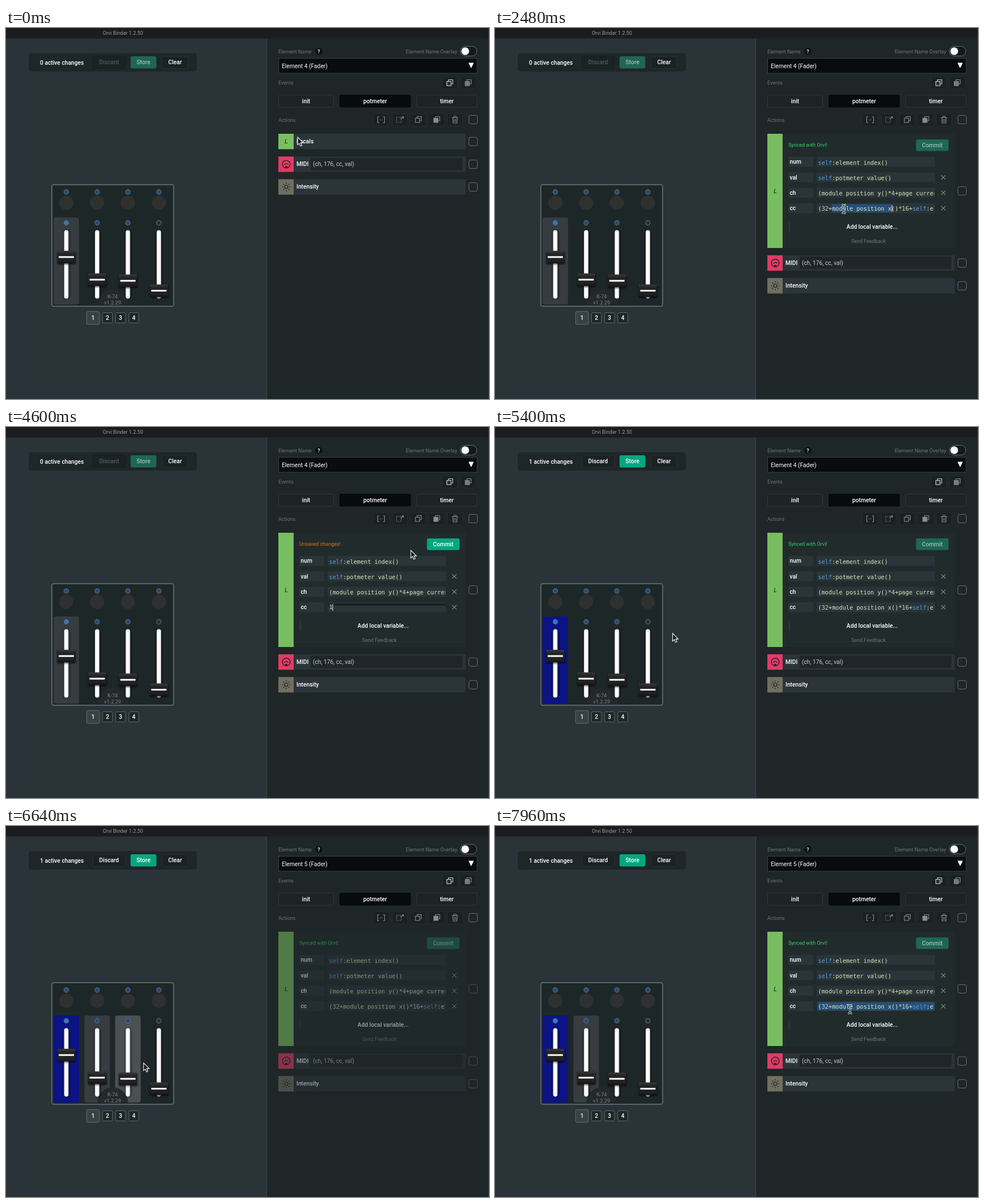
Recreate the animation shown at these times as an HTML page. Size 853 by 656 pixels, loop 8 s.

```html
<!DOCTYPE html>
<html lang="en">
<head>
<meta charset="utf-8">
<title>Fader setup</title>
<style>
  html, body { margin: 0; width: 100%; height: 100%; overflow: hidden; background: #2a3338; }
  svg { display: block; }
  text { font: 400 10.25px Roboto, sans-serif; fill: #fff; white-space: pre; }
  .small { font-size: 9px; }
  .dim { fill: #6c7577; }
  .bold { font-weight: 500; }
  .mid { text-anchor: middle; }
  .code { font: 10.25px "DejaVu Sans Mono", monospace; fill: #dfe6b4; }
  .self { fill: #569cd6; }
  .num { fill: #c5dbb2; }
  .line { fill: none; stroke: #868e90; stroke-width: 1.1; }
</style>
</head>
<body>
<script>
const LOOP = 8000, STEP = 40;
const COLS = [106.5, 161, 215.3, 270];
const CAPS = [405, 445, 447, 464.5];
const ROWS = [237, 264.3, 291.6, 318.9];
const TOP = 187, CLOSED = 27.3, OPEN = 202;

const rect = (x, y, w, h, fill, more = "") =>
  `<rect x="${x}" y="${y}" width="${w}" height="${h}" fill="${fill}" ${more}/>`;
const text = (x, y, str, cls = "", more = "") =>
  `<text x="${x}" y="${y}" class="${cls}" ${more}>${str}</text>`;
const group = (id, body, more = "") => `<g id="${id}" ${more}>${body}</g>`;
const path = (d, more = 'class="line"') => `<path d="${d}" ${more}/>`;
const box = (x, y, w, h, fill, stroke, r = 2) =>
  rect(x + .5, y + .5, w - 1, h - 1, fill, `stroke="${stroke}" rx="${r}"`);
const button = (x, y, w, h, label, fill, stroke, more = "") =>
  box(x, y, w, h, fill, stroke) +
  text(x + w / 2, y + h / 2 + 3.7, label, "bold mid", more);
const check = y => box(817, y - 8, 16, 16, "none", "#697173", 3);

function toolbar() {
  return rect(40, 44.5, 297, 32.5, "#1e2628", 'rx="5"') +
    text(60, 64.5, "0 active changes", "bold", 'id="count"') +
    button(153, 49.5, 58, 22.5, "Discard", "#1b2224", "#151b1d", 'style="fill:#50595b"') +
    button(220, 50, 45.5, 21.5, "Store", "#1f6656", "#1f6656", 'style="fill:#9dbdb4"') +
    button(275, 49.5, 47, 22.5, "Clear", "#1b2224", "#2a3234") +
    group("pending",
      button(153, 49.5, 58, 22.5, "Discard", "#1b2224", "#2a3234") +
      button(220, 50, 45.5, 21.5, "Store", "#06a680", "#06a680"));
}

function led(x, y, fill) {
  return `<circle cx="${x}" cy="${y}" r="4" fill="${fill}" stroke="#586774" stroke-width="1.3"/>`;
}

function fader(x, i) {
  const y = CAPS[i];
  return rect(x - 5, 358, 11, 121, "#0008", 'rx="5" filter="url(#soft)"') +
    rect(x - 4, 357.5, 8, 121, "url(#track)", 'rx="4"') +
    rect(x - 16, y - 10, 33, 23, "#000a", 'rx="2" filter="url(#soft)"') +
    rect(x - 16, y - 11, 32, 22, "url(#cap)", 'rx="1.5"') +
    rect(x - 13.5, y - 1.4, 27, 2.8, "#fff", 'rx=".6"') +
    led(x, 344.5, i == 0 ? "#2a78dc" : i == 3 ? "#263034" : "#1f4b80");
}

function device() {
  const knobs = COLS.map(x => led(x, 290, "#1f4b80") +
    `<circle cx="${x}" cy="309" r="12.5" fill="#2f3131"/>`).join("");
  const lanes = COLS.map((x, i) =>
    rect(x - 22.5, 335, 45, 154, "none", `id="lane${i}" rx="4"`)).join("");
  return rect(81, 277, 215, 215, "#1e2728", 'rx="3.5" stroke="#5b6465" stroke-width="2"') +
    knobs + lanes +
    path("M161.5 489A27 27 0 0 1 215.5 489Z", 'fill="#222a2c"') +
    text(188.3, 478, "K-74", "small bold mid", 'style="fill:#697072"') +
    text(188.3, 489, "v1.2.29", "small bold mid", 'style="fill:#697072"') +
    COLS.map(fader).join("");
}

function pages() {
  const small = [170, 193, 216.5].map((x, i) =>
    button(x, 503, 18.5, 19, i + 2, "#1e2628", "#606869")).join("");
  return button(142, 501, 23.5, 23.5, 1, "#394145", "#666e70") + small;
}

function header() {
  const tool = x => box(x, 151, 28, 22.5, "#1a2123", "#252d2f");
  const stack = (x, y, front) =>
    path(`M${x - 2} ${y - 3}v-2.5h7.5v7.5h-2.5`) + rect(x - 5, y - 2.5, 7.5, 7.5, front, 'class="line" style="fill:' + front + '"');
  return text(481, 44.5, "Element Name", "small dim") +
    '<circle cx="552.5" cy="41.3" r="6.3" fill="#0d1213"/>' +
    text(552.5, 44.6, "?", "small bold mid") +
    text(706, 44.5, "Element Name Overlay", "small dim") +
    rect(802.5, 32.5, 29, 17, "#14191a", 'rx="8.5" stroke="#697173"') +
    '<circle cx="811" cy="41" r="6.8" fill="#fff"/>' +
    box(481, 53, 351.5, 27.5, "#080c0d", "#3b4345", 0) +
    text(487, 70.5, "", "", 'id="element"') +
    path("M816.8 61.5h9.4l-4.7 9.5z", 'fill="#fff"') +
    text(481, 100, "Events", "small dim") +
    box(770, 85.5, 28, 22.5, "#1a2123", "#252d2f") + box(802.5, 85.5, 28, 22.5, "#1a2123", "#252d2f") +
    group("", stack(783.5, 97, "#1a2123"), 'style="filter:brightness(1.5)"') +
    stack(816, 97, "#737b7d") +
    button(481, 118, 98, 22.5, "init", "#1c2426", "#30383a") +
    button(589, 118, 126, 22.5, "potmeter", "#070b0c", "#070b0c") +
    button(724.5, 118, 108, 22.5, "timer", "#1c2426", "#30383a") +
    text(481, 165.5, "Actions", "small dim") +
    [648.5, 681.5, 714, 746.5, 779].map(tool).join("") +
    path("M659 157h-2.5v10.5h2.5M666 157h2.5v10.5h-2.5") +
    path("M660 162.5h5", 'class="line" stroke-dasharray="1.2 1"') +
    path("M690 158h8v9h-8z", 'class="line" stroke-dasharray="1.5 1.5"') +
    path("M697 161l5 -4M699 157h3v3") +
    stack(728, 162, "#1a2123") + stack(760.5, 162, "#868e90") +
    path("M787.5 158.5h11M791 158v-2h4v2M789 159l.7 9h6.6l.7-9M791.7 161v5M794.3 161v5") +
    check(162);
}

function editor(y, name, code, id) {
  return rect(518, y - 9, 44, 17.5, "#2a3439") + text(520.5, y + 3.3, name, "bold") +
    rect(568, y - 9, 209, 17.5, "#2a3439") +
    (id ? rect(0, y - 7.4, 0, 14.6, "#264f78", 'id="pick"') : "") +
    `<svg x="568" y="${y - 9}" width="207.5" height="15.4" ${id ? `id="${id}"` : ""}>` +
    `<text x="2.5" y="13.6" class="code">${code}</text></svg>`;
}

function locals() {
  const self = '<tspan class="self">self</tspan>:';
  const num = n => `<tspan class="num">${n}</tspan>`;
  const cross = ROWS.slice(1).map(y => path(`M788 ${y - 4}l7.5 7.5m0 -7.5l-7.5 7.5`)).join("");
  const [a, b, c, d] = ROWS;
  return rect(508, TOP, 304, OPEN, "#212b2c") +
    text(518, 210.3, "Synced with Orvi!", "small", 'id="synced" style="fill:#2fd565"') +
    text(518, 210.3, "Unsaved changes!", "small", 'id="unsaved" style="fill:#d97a1c"') +
    button(743.5, 197, 57.5, 20.5, "Commit", "#1f6656", "#1f6656", 'style="fill:#9dbdb4"') +
    group("commit", button(743.5, 197, 57.5, 20.5, "Commit", "#06a680", "#06a680")) +
    editor(a, "num", self + "element_index()") +
    editor(b, "val", self + "potmeter_value()") +
    editor(c, "ch", `(module_position_y()*${num(4)}+page_current())`) +
    editor(d, "cc", `(${num(32)}+module_position_x()*${num(16)}+${self}element_index())`, "formula") +
    group("typed", rect(569, 312.5, 208, 3, "#151b1d") + text(570.5, 322.3, "1", "code num", 'id="digit"')) +
    rect(0, 313, 1.2, 12, "#d5d8d8", 'id="caret"') + cross +
    rect(518.5, 342.5, 2.5, 18, "#2e383b") +
    text(666, 355, "Add local variable...", "bold mid") +
    text(659.5, 380.3, "Send Feedback", "small mid dim");
}

function actions() {
  const row = (y, color, name) => rect(508, y, 304, CLOSED, "#2a3439") +
    rect(481, y, 27, CLOSED, color) + text(513, y + 17, name, "bold") + check(y + 13.7);
  const rays = Array.from({ length: 8 }, (_, i) =>
    `<path d="M495 275.5v-2.4" stroke="#15191a" transform="rotate(${i * 45} 495 281)"/>`).join("");
  const pins = [-3, -1.6, 0, 1.6, 3].map(p =>
    `<circle cx="${495 + p}" cy="${239.5 + Math.abs(p) * .6}" r=".8" fill="#15191a"/>`).join("");
  const lower = row(227.2, "#df3c66", "MIDI") + rect(538, 229.5, 268, 22, "#1e2628") +
    text(542, 244.2, "(ch, 176, cc, val)", "", 'style="fill:#c9cdce"') +
    `<circle cx="495" cy="240.8" r="6.8" fill="none" stroke="#15191a" stroke-width="1.2"/>` + pins +
    rect(493, 244.5, 4, 2, "#15191a") +
    row(267.4, "#706f60", "Intensity") +
    '<circle cx="495" cy="281" r="3" fill="none" stroke="#15191a" stroke-width="1.1"/>' + rays;
  return group("closed", rect(508, TOP, 304, CLOSED, "#2a3439") + text(513, 203.7, "Locals", "bold")) +
    `<svg id="open" x="508" y="${TOP}" width="304" height="0" viewBox="508 ${TOP} 304 0">${locals()}</svg>` +
    rect(481, TOP, 27, CLOSED, "#78be60", 'id="strip"') +
    group("mark", text(495, 3.6, "L", "mid", 'style="fill:#15191a;font-style:italic"') + check(0)) +
    group("lower", lower);
}

const beam = "M-3.5 -7.5Q0 -7.5 0 -4.5Q0 -7.5 3.5 -7.5M0 -4.5V4.5M-3.5 7.5Q0 7.5 0 4.5Q0 7.5 3.5 7.5M-2 2H2";
document.body.innerHTML = `<svg width="853" height="656" viewBox="0 0 853 656">
  <defs>
    <linearGradient id="track"><stop stop-color="#d2d2d2"/><stop offset=".3" stop-color="#fff"/>
      <stop offset=".7" stop-color="#fafafa"/><stop offset="1" stop-color="#c8c8c8"/></linearGradient>
    <linearGradient id="cap" x2="0" y2="1"><stop stop-color="#3a3a3a"/><stop offset=".25" stop-color="#242424"/>
      <stop offset=".75" stop-color="#222"/><stop offset="1" stop-color="#161616"/></linearGradient>
    <filter id="soft" x="-50%" y="-50%" width="200%" height="200%"><feGaussianBlur stdDeviation="1.6"/></filter>
  </defs>` +
  rect(0, 0, 853, 656, "#2a3338") + rect(461, 18.5, 392, 638, "#1e2628") +
  rect(460, 18.5, 1, 638, "#3d4648") + rect(0, 0, 853, 18.5, "#1b1c20") + rect(852, 0, 1, 656, "#343a3d") +
  text(171, 11.5, "Orvi Binder 1.2.50", "small", 'style="fill:#9a9b9d"') +
  toolbar() + device() + pages() + header() + group("list", actions()) +
  group("arrow", path("M0 0V13.6L3.1 10.8L5.2 15.7L7.6 14.7L5.5 9.9H9.8Z", 'fill="#111" stroke="#fff" stroke-width="1.1"')) +
  group("beam", path(beam, 'fill="none" stroke="#fff" stroke-width="2.8"') +
    path(beam, 'fill="none" stroke="#111" stroke-width="1.1"')) + "</svg>";

// Pointer stops: time, x, y
const STOPS = [
  [160, 515, 193], [320, 499, 178], [560, 521, 201], [1160, 521, 201], [1640, 556, 240],
  [1720, 556, 240], [2000, 606, 334], [2160, 616, 320], [2520, 616, 320], [2760, 618, 330],
  [4240, 618, 330], [4600, 715, 218], [4760, 769, 208], [5080, 769, 208], [5520, 212, 400],
  [5640, 216, 398], [5840, 251, 391], [5960, 256, 390], [6200, 163, 404], [6480, 165, 412],
  [6640, 243, 419], [7160, 618, 320], [7240, 618, 320], [7400, 627, 324]
];
const $ = id => document.getElementById(id);
const set = (id, key, value) => $(id).setAttribute(key, value);
const fade = (id, value) => set(id, "opacity", value);
const ramp = (t, start, span) => Math.min(1, Math.max(0, (t - start) / span));
const within = (t, a, b) => t >= a && t < b;

function pointer(t) {
  const i = STOPS.findIndex(s => s[0] > t);
  if (i == 0) return STOPS[0].slice(1);
  if (i < 0) return STOPS[STOPS.length - 1].slice(1);
  const [t0, x0, y0] = STOPS[i - 1], [t1, x1, y1] = STOPS[i];
  const p = (t - t0) / (t1 - t0), e = p * p * (3 - 2 * p);
  return [x0 + (x1 - x0) * e, y0 + (y1 - y0) * e];
}

function drawPointer(t) {
  const [x, y] = pointer(t);
  const hidden = within(t, 3320, 4280);
  const editing = x > 568 && x < 777 && ROWS.some(r => Math.abs(y - r) < 12) && t > 960;
  for (const id of ["arrow", "beam"]) {
    set(id, "transform", `translate(${x} ${y})`);
    fade(id, !hidden && (id == "beam") == editing ? 1 : 0);
  }
}

function drawLanes(t, chosen) {
  const [x, y] = pointer(t - STEP);
  const over = x < 297 && y > 335 && y < 489 ? Math.round((x - COLS[0]) / 54.5) : -1;
  COLS.forEach((_, i) => {
    const fill = i == over ? "#495153" : i == 0 && t >= 4880 ? "#0b1484" :
      i == chosen ? "#363c3f" : "none";
    set("lane" + i, "fill", fill);
  });
}

function drawFormula(t) {
  const edited = within(t, 3320, 4880);
  const word = within(t, 2200, 2600) || within(t, 7520, 7760);
  const all = within(t, 2600, 3320) || t >= 7760;
  set("pick", "x", word ? 595 : 570);
  set("pick", "width", word ? 106 : all ? 206 : 0);
  fade("formula", edited ? 0 : 1);
  fade("typed", edited ? 1 : 0);
  fade("digit", t >= 4280 ? 1 : 0);
  set("caret", "x", word ? 700.5 : t >= 4280 ? 576.3 : 570.5);
  fade("caret", word || within(t, 3320, 3800) || within(t, 4280, 4800) ? 1 : 0);
}

function draw(t) {
  const element = t < 5520 ? 4 : t < 6480 ? 6 : 5;
  $("element").textContent = `Element ${element} (Fader)`;
  $("count").textContent = `${t < 4880 ? 0 : 1} active changes`;
  fade("pending", ramp(t, 4840, 160));

  const grow = 1 - (1 - ramp(t, 800, 160)) ** 2;
  const h = CLOSED + (OPEN - CLOSED) * grow;
  set("strip", "height", h);
  set("open", "height", grow ? h : 0);
  set("open", "viewBox", `508 ${TOP} 304 ${h}`);
  fade("open", grow ? 1 : 0);
  fade("closed", grow ? 0 : 1);
  set("mark", "transform", `translate(0 ${TOP + h / 2})`);
  set("lower", "transform", `translate(0 ${h - CLOSED})`);

  const dirty = ramp(t, 3280, 240) * (1 - ramp(t, 4840, 200));
  fade("commit", dirty);
  fade("unsaved", dirty);
  fade("synced", ramp(t, 880, 160) * (1 - dirty));
  fade("list", t < 5520 ? 1 : ramp(t, t < 6480 ? 5520 : 6480, 285));

  drawLanes(t, [0, 1, 2][element - 4]);
  drawFormula(t);
  drawPointer(t);
}

const begin = performance.now();
function tick() {
  const t = (performance.now() - begin) % LOOP;
  draw(Math.floor(t / STEP) * STEP);
  requestAnimationFrame(tick);
}
tick();
</script>
</body>
</html>
```
